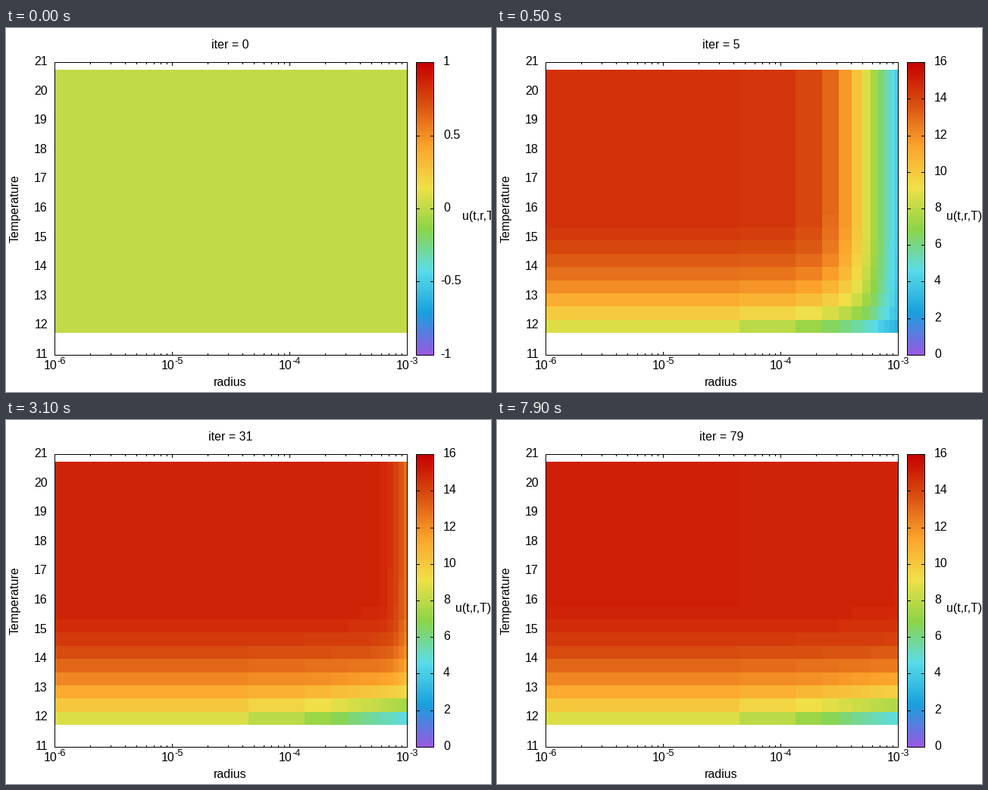
Recreate the animation shown at these times as a matplotlib script. Size 640 by 480 pixels, loop 8 s.

```python
import numpy as np
import matplotlib.pyplot as plt
from matplotlib.animation import FuncAnimation
from matplotlib.collections import LineCollection
from matplotlib.colors import LinearSegmentedColormap

W, H, DPI = 640, 480, 100
PX = 72 / DPI
LEFT, RIGHT, TOP, BOTTOM = 64, 529, 45, 431
BAR_L, BAR_R = 541, 564
DECADE = (RIGHT - LEFT) / 3
NR, NT = 12, 20

plt.rcParams["font.family"] = "Liberation Sans"
cmap = LinearSegmentedColormap.from_list("heat", [
    "#965ae1", "#18a0dc", "#5adce8", "#8cd446",
    "#f0e048", "#fca42c", "#d85010", "#c80000"], N=128)

fig = plt.figure(figsize=(W / DPI, H / DPI), dpi=DPI, facecolor="white")
ax = fig.add_axes([0, 0, 1, 1])
ax.axis("off")


def text(x, y, s, size=16, ha="center", **kw):
    return ax.text(x, y, s, fontsize=size * PX, ha=ha, va="baseline", **kw)


def hline(x0, x1, y):
    return [(x0, y + 0.5), (x1, y + 0.5)]


def vline(x, y0, y1):
    return [(x + 0.5, y0), (x + 0.5, y1)]


def box(x0, x1):
    return [hline(x0, x1 + 1, TOP), hline(x0, x1 + 1, BOTTOM),
            vline(x0, TOP, BOTTOM + 1), vline(x1, TOP, BOTTOM + 1)]


def add_lines(segs):
    lines = LineCollection(segs, colors="black", linewidths=PX,
                           capstyle="butt", zorder=3)
    lines.set_snap(False)
    return ax.add_collection(lines, autolim=False)


def field(n):
    """Relaxation towards an equilibrium that depends on radius and T."""
    i, j = np.arange(NR)[None, :], np.arange(NT)[:, None]
    p = i ** 1.2
    level = 15 - 0.078 * np.maximum(9 - j, 0) ** 2
    level = level - 5.3 * p / (p + 6) * 0.6 ** j
    rate = 0.72 / (1 + (i / 3.4) ** 2) * 15 / level
    return level * (1 - np.exp(-rate * n))


def color_range(u):
    top = u.max()
    if top == 0:
        return -1, 1, 0.5
    step = 2 if top > 10 else 1
    return 0, int(np.ceil(top / step)) * step, step


# Heat map on a logarithmic radius axis
r_edges = (np.arange(NR - 1) + 0.5) * 9e-5
x_edges = np.r_[LEFT, np.round(LEFT + DECADE * (np.log10(r_edges) + 6)), RIGHT]
t_edges = 11.75 + 0.45 * np.arange(NT + 1)
y_edges = np.round(BOTTOM - (BOTTOM - TOP) / 10 * (t_edges - 11))
mesh = ax.pcolormesh(x_edges, y_edges, field(0), cmap=cmap, antialiased=False)

# Colour bar
ax.pcolormesh([BAR_L, BAR_R], np.linspace(BOTTOM, TOP, 129),
              np.arange(128)[:, None], cmap=cmap, vmin=0, vmax=127,
              antialiased=False)

# Frames and radius ticks
segs = box(LEFT, RIGHT) + box(BAR_L, BAR_R)
for d in range(3):
    for m in range(1, 10):
        x = round(LEFT + DECADE * (d + np.log10(m)))
        size = 5 if m == 1 else 3
        segs += [vline(x, TOP, TOP + size),
                 vline(x, BOTTOM + 1 - size, BOTTOM + 1)]
add_lines(segs)

# Axis labels
for t in range(11, 22):
    y = round(BOTTOM - (BOTTOM - TOP) / 10 * (t - 11))
    text(55, y + 4, str(t), ha="right")
for d in range(4):
    x = LEFT + DECADE * d
    text(x - 14.5, 450, "10", ha="left")
    text(x + 3.5, 443, f"-{6 - d}", size=12.8, ha="left")
text(296, 472, "radius")
text(17, 238, "Temperature", rotation=90, rotation_mode="anchor")

title = text(296, 27, "")
bar_name = text(616.5, 253, "u(t,r,T)")
bar_ticks = add_lines([])
bar_labels = [text(577, 0, "", ha="left") for _ in range(9)]

ax.set_xlim(0, W)
ax.set_ylim(H, 0)


def draw(n):
    u = field(n)
    lo, hi, step = color_range(u)
    mesh.set_array(u)
    mesh.set_clim(lo, hi)
    title.set_text(f"iter = {n}")

    values = np.arange(lo, hi + step / 2, step)
    names = [f"{v: g}" for v in values]
    ticks = []
    for label in bar_labels:
        label.set_text("")
    for label, v, name in zip(bar_labels, values, names):
        y = round(BOTTOM - (BOTTOM - TOP) * (v - lo) / (hi - lo))
        ticks += [hline(BAR_L, BAR_L + 5, y), hline(BAR_R - 4, BAR_R + 1, y)]
        label.set_text(name.strip())
        label.set_position((573 if v < 0 else 577, y + 4))
    bar_ticks.set_segments(ticks)
    bar_name.set_x(589.5 + 9 * max(map(len, names)))
    return [mesh, title, bar_name, bar_ticks, *bar_labels]


anim = FuncAnimation(fig, draw, frames=80, interval=100, repeat=True,
                     repeat_delay=0, blit=False)
plt.show()
```
